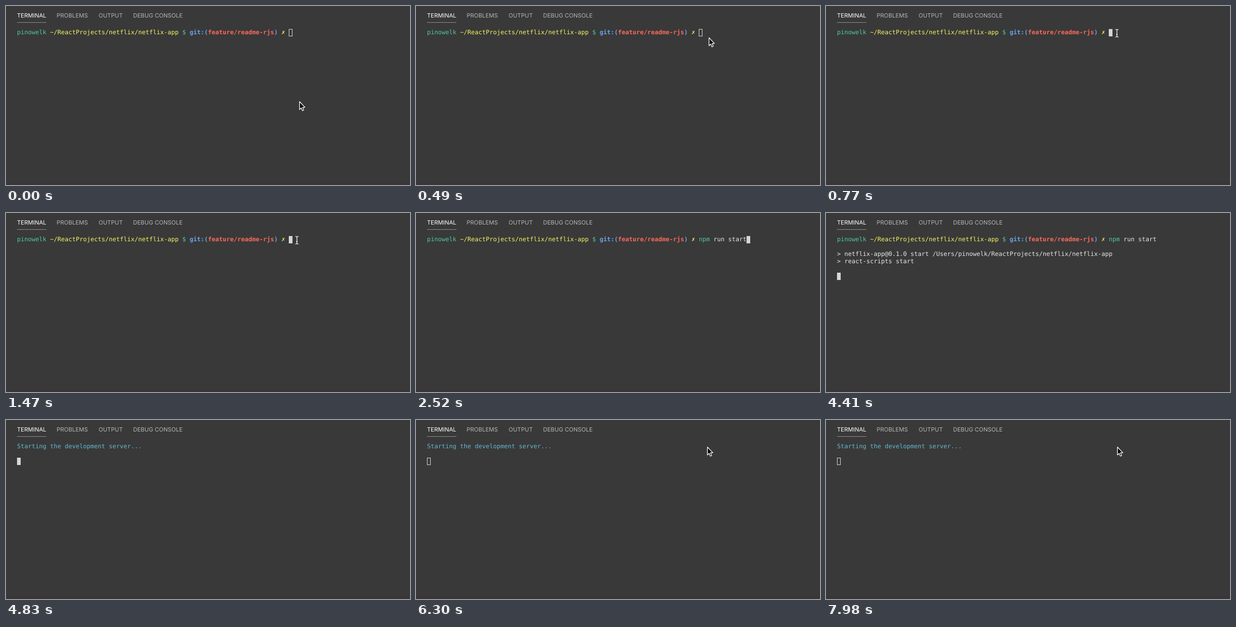
Write an HTML page that moves like this. It is 770 px wide and 342 px high and loops after 8 s.

```html
<!DOCTYPE html>
<html lang="en">
<head>
<meta charset="utf-8">
<title>Terminal</title>
<style>
  html, body { margin: 0; width: 100%; height: 100%; overflow: hidden; background: #393939; }
  svg { display: block; width: 770px; height: 342px; }
  text { white-space: pre; text-rendering: geometricPrecision; }
  .tab { font: 11px Inter, sans-serif; fill: #b6b6b6; }
  .active { fill: #fff; }
  .mono { font: 11.63px "DejaVu Sans Mono", monospace; fill: #e6e6e6; }
  .green { fill: #4fc99c; }
  .yellow { fill: #f3f463; }
  .blue { fill: #6ba2ea; }
  .red { fill: #f96a5d; }
  .cyan { fill: #62b7d2; }
  .bold { font-weight: bold; }
</style>
</head>
<body>
<svg viewBox="0 0 770 342">
  <rect width="770" height="342" fill="#393939"/>
  <rect y="336" width="770" height="6" fill="#3a3637"/>
  <g id="tabs"></g>
  <rect x="21" y="31" width="56" height="1" fill="#8c8c8c"/>
  <g id="prompt"></g>
  <g id="command"></g>
  <g id="output"></g>
  <g id="server"></g>
  <rect id="block" width="7" height="14" fill="#d6d6d6"/>
  <rect id="hollow" width="6" height="13" fill="none" stroke="#d6d6d6"/>
  <path id="arrow" d="M.5 .8V15.8L3.8 12.7L6 18L8.5 17L6.3 11.6H10.8Z"
        fill="#000" stroke="#fff" stroke-width="1.3" stroke-linejoin="round"/>
  <path id="beam" d="M551.5 44.6Q554 44.6 554.5 46.2Q555 44.6 557.5 44.6M554.5 46V58M551.5 59.4Q554 59.4 554.5 57.8Q555 59.4 557.5 59.4M553 54.5H556"
        fill="none" stroke="#fff" stroke-width="1.2"/>
</svg>
<script>
const LOOP = 8000, STEP = 70;
const CELL = 7, LINE = 14, LEFT = 21, BASE = 54;
const FOCUS = 770, TYPED = 1610, ENTER = 2660, PRINTED = 2870, CLEARED = 4830, BLUR = 5250;
const $ = id => document.getElementById(id);

function addText(group, x, y, className, content) {
  const node = document.createElementNS("http://www.w3.org/2000/svg", "text");
  node.setAttribute("x", x);
  node.setAttribute("y", y);
  node.setAttribute("class", className);
  node.textContent = content;
  $(group).append(node);
}

const write = (group, col, row, color, content) =>
  addText(group, LEFT + col * CELL, BASE + row * LINE, "mono " + color, content);

[[21, "TERMINAL"], [96.5, "PROBLEMS"], [176.5, "OUTPUT"], [242.3, "DEBUG CONSOLE"]]
  .forEach(([x, label], i) => addText("tabs", x, 22, i ? "tab" : "tab active", label));

const user = "pinowelk", project = "ReactProjects/netflix/netflix-app";
write("prompt", 0, 0, "green", user);
write("prompt", 9, 0, "yellow", "~/" + project);
write("prompt", 45, 0, "green", "$");
write("prompt", 47, 0, "blue bold", "git:(");
write("prompt", 52, 0, "red bold", "feature/readme-rjs");
write("prompt", 70, 0, "blue bold", ")");
write("prompt", 72, 0, "yellow bold", "✗");
write("command", 74, 0, "green", "npm");
write("command", 78, 0, "", "run start");
write("output", 0, 2, "", `> netflix-app@0.1.0 start /Users/${user}/${project}`);
write("output", 0, 3, "", "> react-scripts start");
write("server", 0, 0, "cyan", "Starting the development server...");

// Text cursor cells: [time, column, row]
const caret = [[0, 74, 0], [TYPED, 87, 0], [ENTER, 0, 1], [PRINTED, 0, 5], [CLEARED, 0, 2]];
// Pointer tip: [time, x, y]
const pointer = [[0, 559, 182], [140, 567, 147], [280, 567, 101], [420, 560, 66],
  [490, 558, 60], [630, 555, 52], [700, 554, 51]];

const show = (id, on) => $(id).setAttribute("visibility", on ? "visible" : "hidden");
const move = (id, x, y) => $(id).setAttribute("transform", `translate(${x} ${y})`);

function pointerAt(t) {
  const next = pointer.findIndex(key => key[0] > t);
  if (next < 0) return pointer.at(-1).slice(1);
  const [t0, x0, y0] = pointer[next - 1], [t1, x1, y1] = pointer[next];
  const k = (t - t0) / (t1 - t0);
  return [x0 + (x1 - x0) * k, y0 + (y1 - y0) * k];
}

function draw(time) {
  const t = Math.floor((time % LOOP) / STEP) * STEP;
  const focused = t >= FOCUS && t < BLUR;

  show("prompt", t < CLEARED);
  show("command", t >= TYPED && t < CLEARED);
  show("output", t >= PRINTED && t < CLEARED);
  show("server", t >= CLEARED);

  const [, col, row] = caret.findLast(key => key[0] <= t);
  const x = LEFT + col * CELL, y = BASE - 10 + row * LINE;
  move("block", x, y);
  move("hollow", x + .5, y + .5);
  show("block", focused);
  show("hollow", !focused);

  move("arrow", ...(t < BLUR ? pointerAt(t) : [555, 51]));
  show("arrow", !focused);
  show("beam", focused && t < TYPED);
}

const start = performance.now();
function tick() {
  draw(performance.now() - start);
  requestAnimationFrame(tick);
}
tick();
</script>
</body>
</html>
```
